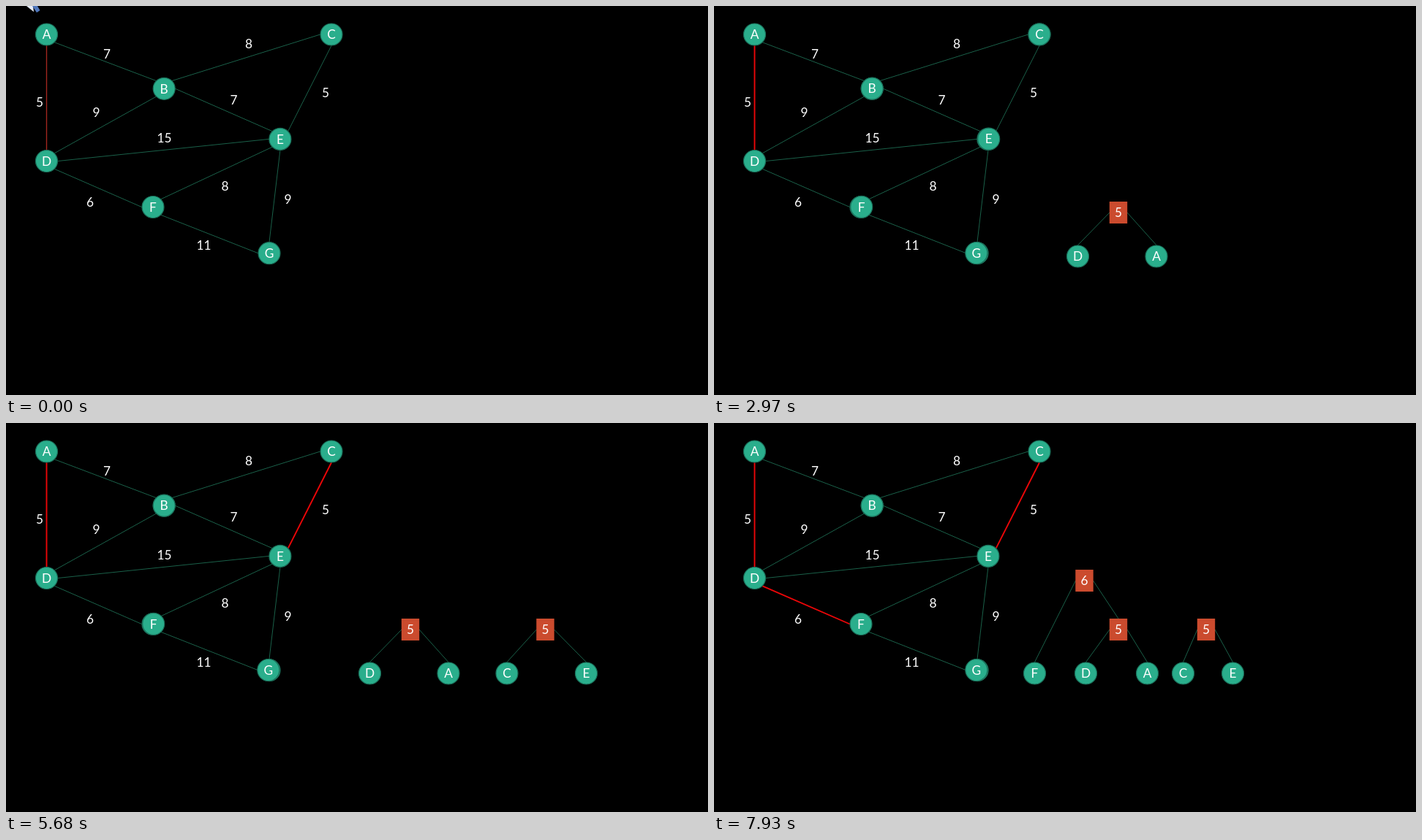
Animation of 960 by 533 pixels, one loop 8 s. Source, as an HTML page with a canvas:

```html
<!DOCTYPE html>
<html lang="en">
<head>
<meta charset="utf-8">
<title>Building a tree from a weighted graph</title>
<style>
  html, body { margin: 0; width: 100%; height: 100%; overflow: hidden; background: #000; }
  canvas { display: block; }
</style>
</head>
<body>
<canvas id="stage" width="960" height="533"></canvas>
<script>
const ctx = document.getElementById('stage').getContext('2d');
const LOOP = 8000, RADIUS = 15.3, STEP = 210;
const GREEN = [26, 96, 73], RED = [236, 6, 8];
const COMPASS = ['E', 'SE', 'S', 'SW', 'W', 'NW', 'N', 'NE'];

const NODES = { A: [55.5, 39], B: [216.2, 113.3], C: [445, 39], D: [55.5, 212.5],
                E: [374.9, 182.4], F: [201, 275.5], G: [360, 338.7] };
// Sideways slip of the duplicates that wait on top of the nodes
const SLIP = { D: .4, E: .8, F: .7, G: -1.2 };

// Each edge joins two compass points; its weight stands at the given place
const EDGES = [
  ['A SE', 'B NW', 7, 138, 66],
  ['A S', 'D N', 5, 46, 132],
  ['B NE', 'C W', 8, 332, 52],
  ['B E', 'E NW', 7, 311.5, 129],
  ['C S', 'E NE', 5, 437, 118.5],
  ['D NE', 'B SW', 9, 123.5, 145.5],
  ['D E', 'E W', 15, 216.5, 180.5],
  ['D SE', 'F W', 6, 115, 269],
  ['F NE', 'E SW', 8, 299.5, 246.5],
  ['F SE', 'G W', 11, 270.5, 328],
  ['E S', 'G N', 9, 385.5, 265]
].map(([from, to, weight, ...place]) =>
  ({ name: from[0] + to[0], ends: [from, to].map(anchor), weight, place }));

const progress = (t, from, to) => Math.min(1, Math.max(0, (t - from) / (to - from)));
const ease = p => p < .5 ? 2 * p * p : 1 - 2 * (1 - p) ** 2;
const lerp = (a, b, p) => a + (b - a) * p;
const mix = (from, to, p) => from.map((v, i) => lerp(v, to[i], p));
const rgb = c => `rgb(${c.map(Math.round)})`;

function anchor(spec) {
  const [name, side] = spec.split(' ');
  const angle = COMPASS.indexOf(side) * Math.PI / 4;
  const [x, y] = NODES[name];
  return [x + RADIUS * Math.cos(angle), y + RADIUS * Math.sin(angle)];
}

// The picture advances in even steps during each burst and rests in between
const BURSTS = [[160, 1080], [1280, 1910], [2570, 2970], [3410, 4230],
                [4670, 5680], [6120, 6730], [7130, 7930]];
function stepped(time) {
  const burst = BURSTS.findLast(([start]) => start <= time);
  if (!burst) return 0;
  const [start, end] = burst;
  const step = (end - start) / Math.round((end - start) / STEP);
  return Math.min(end, start + step * Math.floor((time - start) / step));
}

function line(from, to, red = 0) {
  ctx.strokeStyle = rgb(mix(GREEN, RED, red));
  ctx.lineWidth = 1 + .9 * red * red;
  ctx.beginPath();
  ctx.moveTo(...from);
  ctx.lineTo(...to);
  ctx.stroke();
}

function text(value, x, y) {
  ctx.fillStyle = '#fff';
  ctx.fillText(value, x, y + 6.2);
}

function node(name, [x, y]) {
  ctx.beginPath();
  ctx.arc(x, y, 15, 0, 2 * Math.PI);
  ctx.fillStyle = '#2aae8c';
  ctx.fill();
  ctx.strokeStyle = '#1b705a';
  ctx.lineWidth = 1.2;
  ctx.stroke();
  text(name, x, y);
}

// A weight in a square, joined to the tops of two children
function branch(value, [x, y], left, right, alpha) {
  ctx.globalAlpha = alpha;
  line([x - 12, y], left);
  line([x + 12, y], right);
  ctx.fillStyle = '#cb4b2e';
  ctx.fillRect(x - 12.2, y - 15, 24.4, 30);
  text(value, x, y);
  ctx.globalAlpha = 1;
}

function polygon(color, ...points) {
  ctx.fillStyle = color;
  ctx.beginPath();
  for (const point of points) ctx.lineTo(...point);
  ctx.fill();
}

function pointer() {
  polygon('#e4ebf7', [28, 0], [37, 0], [38, 8]);
  polygon('#5078bd', [36, 0], [43, 0], [46.5, 6], [42, 9]);
}

function draw(t) {
  ctx.fillStyle = '#000';
  ctx.fillRect(0, 0, 960, 533);
  ctx.font = '17.3px Lato, sans-serif';
  ctx.textAlign = 'center';

  const moveAD = ease(progress(t, 581, 1581));
  const moveCE = ease(progress(t, 4474, 5224));
  const moveF = ease(progress(t, 7038, 7788));
  const moves = { A: moveAD, D: moveAD, C: moveCE, E: moveCE, F: moveF };
  const red = { AD: progress(t, -700, 380), CE: progress(t, 3210, 4230), DF: progress(t, 5920, 6730) };
  const leaving = moveAD > 0 && moveAD < 1;

  // Edges at A are hidden while its duplicate leaves
  for (const { name, ends, weight, place } of EDGES) {
    if (!leaving || name[0] !== 'A') line(...ends, red[name]);
    text(weight, ...place);
  }
  for (const name in NODES) node(name, NODES[name]);

  // The tree narrows while F travels to join it
  const narrow = (wide, tight) => lerp(wide, tight, moveF);
  const slots = { A: narrow(605, 592.5), D: narrow(497.5, 508.5), F: 438.5,
                  C: narrow(685, 641.5), E: narrow(793.5, 709.5) };
  const top = name => [slots[name], 343 - RADIUS];
  branch(6, [506.5, 216], top('F'), [553, 268], progress(t, 7430, 7930));
  branch(5, [553, 283], top('D'), top('A'), progress(t, 2440, 2970));
  branch(5, [narrow(737.5, 673), 283], top('C'), top('E'), progress(t, 5150, 5680));

  if (moveAD > 0) {
    for (const name of 'BGFECDA') {
      const [x, y] = NODES[name];
      node(name, mix([x + (SLIP[name] || 0), y - .2], [slots[name] || 0, 343], moves[name] || 0));
    }
  }
  if (t === 0) pointer();
}

function frame() {
  draw(stepped(performance.now() % LOOP));
  requestAnimationFrame(frame);
}
frame();
</script>
</body>
</html>
```
